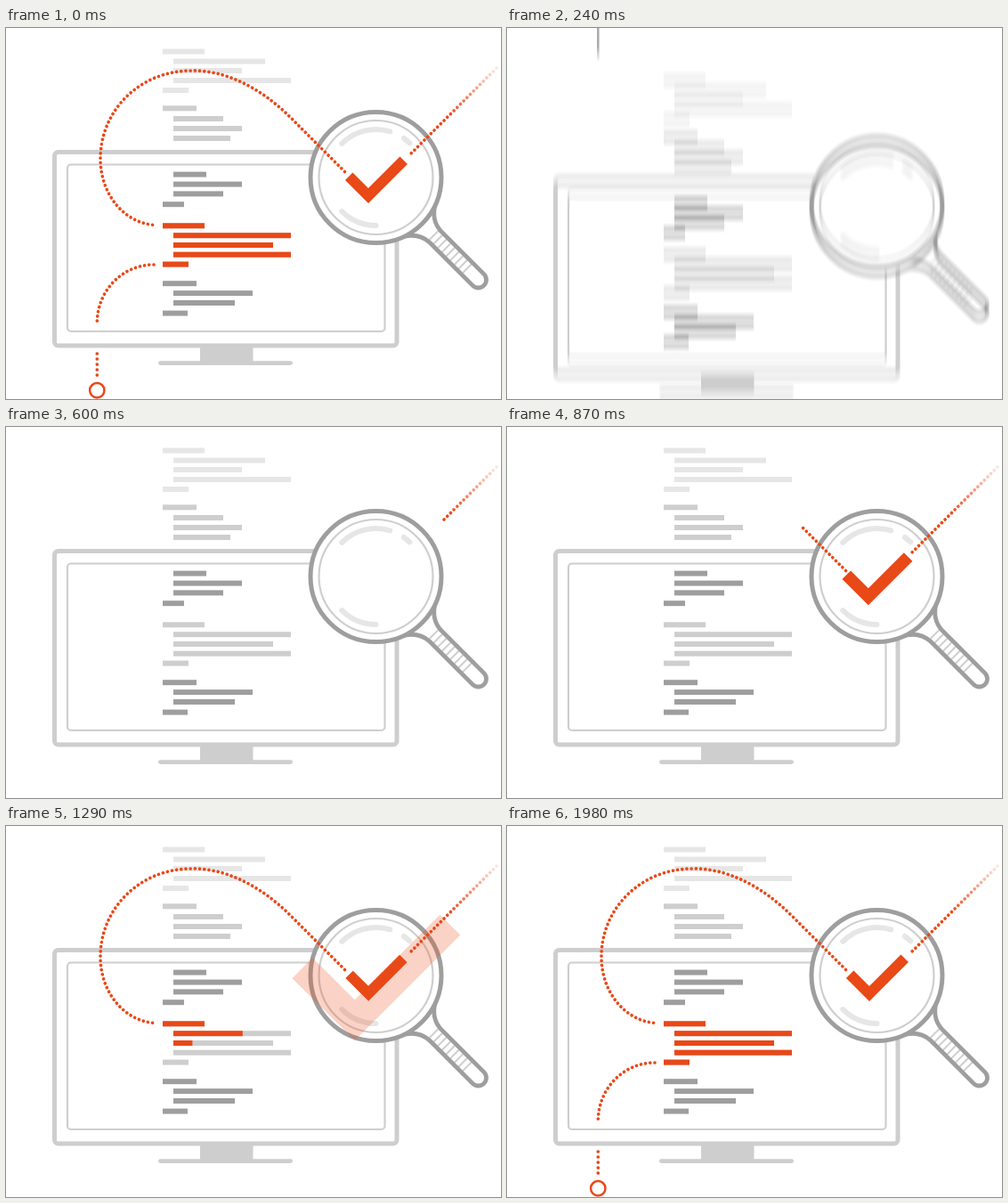
These frames come from a looping animation (556x417 px, 2490 ms). An HTML page with a canvas:

```html
<!DOCTYPE html>
<html lang="en">
<head>
<meta charset="utf-8">
<title>Code review</title>
<style>
html, body { margin: 0; width: 100%; height: 100%; overflow: hidden; background: #fff; }
canvas { display: block; }
</style>
</head>
<body>
<canvas id="stage" width="556" height="417"></canvas>
<script>
const W = 556, H = 417, LOOP = 2490, STEP = 30;
const PAGE = 530, PAD = 70;
const ORANGE = '#e94817', DARK = '#9e9e9e', MID = '#cecece', LIGHT = '#e6e6e6';
const ctx = document.getElementById('stage').getContext('2d');
const buffer = document.createElement('canvas');
buffer.width = W;
buffer.height = H + 2 * PAD;
const bctx = buffer.getContext('2d');

// Code blocks: colour, then rows of [y, indent, width]
const blocks = [
  [LIGHT, [[26.5, 0, 47], [37.5, 1, 103], [48, 1, 77], [59, 1, 132], [70, 0, 29]]],
  [MID, [[90.3, 0, 38], [102, 1, 56], [113, 1, 77], [124, 1, 64]]],
  [DARK, [[164.6, 1, 37], [175.6, 1, 77], [186.4, 1, 56], [198.2, 0, 24]]],
  [MID, [[222.3, 0, 47], [233.2, 1, 132], [244, 1, 112], [254.7, 1, 132], [265.6, 0, 29]]],
  [DARK, [[287.2, 0, 38], [298.1, 1, 89], [309, 1, 69], [320.6, 0, 28]]]
];
// Start and length of each highlight sweep
const sweeps = [[1038, 220], [1122, 300], [1206, 300], [1296, 300], [1540, 120]];

const ramp = (t, a, b) => Math.min(1, Math.max(0, (t - a) / (b - a)));
const smooth = u => u * u * (3 - 2 * u);
const mix = (a, b, u) => a + (b - a) * u;

function pop(t, start, top, end, peak, rest) {
  return t < top ? peak * smooth(ramp(t, start, top))
                 : mix(peak, rest, smooth(ramp(t, top, end)));
}

function stroke(g, path, color, width) {
  g.strokeStyle = color;
  g.lineWidth = width;
  g.stroke(path);
}

function roundRect(x, y, w, h, r) {
  const p = new Path2D();
  p.roundRect(x, y, w, h, r);
  return p;
}

function arc(r, from, to) {
  const p = new Path2D(), rad = Math.PI / 180;
  p.arc(0, 0, r, from * rad, to * rad);
  return p;
}

const screen = roundRect(54.5, 139.5, 384.5, 217.5, 4);
const bezel = roundRect(69, 153.5, 356.5, 187.5, 4);
const handle = new Path2D('M69 -25Q78 -10 94 -9H162.6A9 9 0 0 1 162.6 9H94Q78 10 69 25');
const tick = new Path2D('M385.2 166.8L407 188.5L446.7 148.8');
const ray = new Path2D('M551 45L451 145');
const loop = new Path2D('M380.5 161.5L320 101C285 66 245 47 208 48C150 48 106 93 106 147C106 188 134 220 168 221.5');
const tail = new Path2D('M166 266C130 266 102.3 296 102.3 331.5');
const stub = new Path2D('M102.3 366V392');

function bar(g, [y, indent, w], color, part = 1) {
  g.fillStyle = color;
  g.fillRect(176 + 12 * indent, y - 3, w * part, 6);
}

function dots(g, path, length, gap, part, color = ORANGE) {
  const n = Math.floor(length / gap * part + 0.01);
  if (part <= 0 || n < 1) return;
  const dash = [];
  for (let i = 0; i < n; i++) dash.push(0.01, gap);
  dash[dash.length - 1] = 9999;
  g.save();
  g.lineCap = 'round';
  g.setLineDash(dash);
  stroke(g, path, color, 3.7);
  g.restore();
}

function monitor(g) {
  stroke(g, screen, MID, 5);
  stroke(g, bezel, MID, 2.2);
  g.fillStyle = MID;
  g.fillRect(218, 358, 59.5, 18);
  g.fill(roundRect(171, 374.2, 151, 4.8, 2.4));
}

function lens(g) {
  g.save();
  g.translate(415.5, 168);
  g.fillStyle = '#fff';
  g.save();
  g.rotate(Math.PI / 4);
  g.fill(handle);
  for (let u = 92; u < 150; u += 6.6) stroke(g, new Path2D(`M${u} -7V7`), MID, 2);
  stroke(g, handle, DARK, 4.8);
  g.restore();
  const ring = arc(73.5, 0, 360);
  g.fill(ring);
  stroke(g, ring, DARK, 5);
  stroke(g, arc(64, 0, 360), MID, 2.2);
  g.lineCap = 'round';
  for (const [a, b] of [[225, 287], [305.5, 314.5], [90, 135]]) stroke(g, arc(54, a, b), LIGHT, 6);
  g.restore();
}

function check(g, scale, alpha) {
  if (scale <= 0 || alpha <= 0) return;
  g.save();
  g.globalAlpha = alpha;
  g.translate(416, 171);
  g.scale(scale, scale);
  g.translate(-416, -171);
  stroke(g, tick, ORANGE, 12);
  g.restore();
}

function scene(g, t) {
  for (const [color, rows] of blocks) rows.forEach(row => bar(g, row, color));
  monitor(g);
  sweeps.forEach(([start, span], i) =>
    bar(g, blocks[3][1][i], ORANGE, smooth(ramp(t, start, start + span))));
  lens(g);

  const wave = ramp(t, 900, 1670);
  if (wave > 0) check(g, 1 + 1.93 * (1 - (1 - wave) ** 3), 0.49 * (1 - wave));

  const fade = g.createLinearGradient(553, 43, 497, 99);
  fade.addColorStop(0, 'rgba(233,72,23,0.1)');
  fade.addColorStop(1, ORANGE);
  dots(g, ray, 144, 5.2, ramp(t, 455, 690), fade);
  check(g, t < 910 ? pop(t, 690, 780, 910, 1.7, 0.96)
                   : mix(0.96, 1, smooth(ramp(t, 910, 1500))), 1);
  dots(g, loop, 484, 5.2, ramp(t, 840, 1034));

  dots(g, tail, 109, 5.2, ramp(t, 1650, 1800));
  dots(g, stub, 30, 6, ramp(t, 1800, 1850));
  const size = pop(t, 1830, 1900, 1980, 1.65, 1);
  if (size > 0) {
    g.save();
    g.translate(102.3, 407.3);
    g.scale(size, size);
    stroke(g, arc(8.2, 0, 360), ORANGE, 2.5);
    g.restore();
  }
}

// Pages scroll up with a vertical motion blur
function scroll(t) {
  const left = 1 - ramp(t, 114, 330);
  const shift = PAGE * (1 - left ** 3.2);
  const blur = Math.min(80, 0.5 * PAGE * 3.2 * left ** 2.2 * STEP / 216);
  bctx.globalAlpha = 1;
  bctx.fillStyle = '#fff';
  bctx.fillRect(0, 0, W, buffer.height);
  bctx.save();
  bctx.translate(0, PAD - shift);
  scene(bctx, LOOP);
  stroke(bctx, new Path2D('M102.3 417V527'), '#aaa', 2.5);
  bctx.translate(0, PAGE);
  scene(bctx, 0);
  bctx.restore();

  let moved = 0;
  bctx.globalAlpha = 0.5;
  for (let s = blur / 2; s >= 0.6; s /= 2) {
    const px = Math.round(s);
    bctx.drawImage(buffer, 0, px);
    moved += px;
  }
  ctx.drawImage(buffer, 0, -PAD - Math.round(moved / 2));
}

function draw(now) {
  const t = Math.floor(now % LOOP / STEP) * STEP;
  ctx.fillStyle = '#fff';
  ctx.fillRect(0, 0, W, H);
  if (t < 120) scene(ctx, LOOP);
  else if (t < 330) scroll(t);
  else scene(ctx, t);
}

let begin;
function tickFrame(now) {
  begin ??= now;
  draw(Math.max(0, now - begin));
  requestAnimationFrame(tickFrame);
}
draw(0);
requestAnimationFrame(tickFrame);
</script>
</body>
</html>
```
